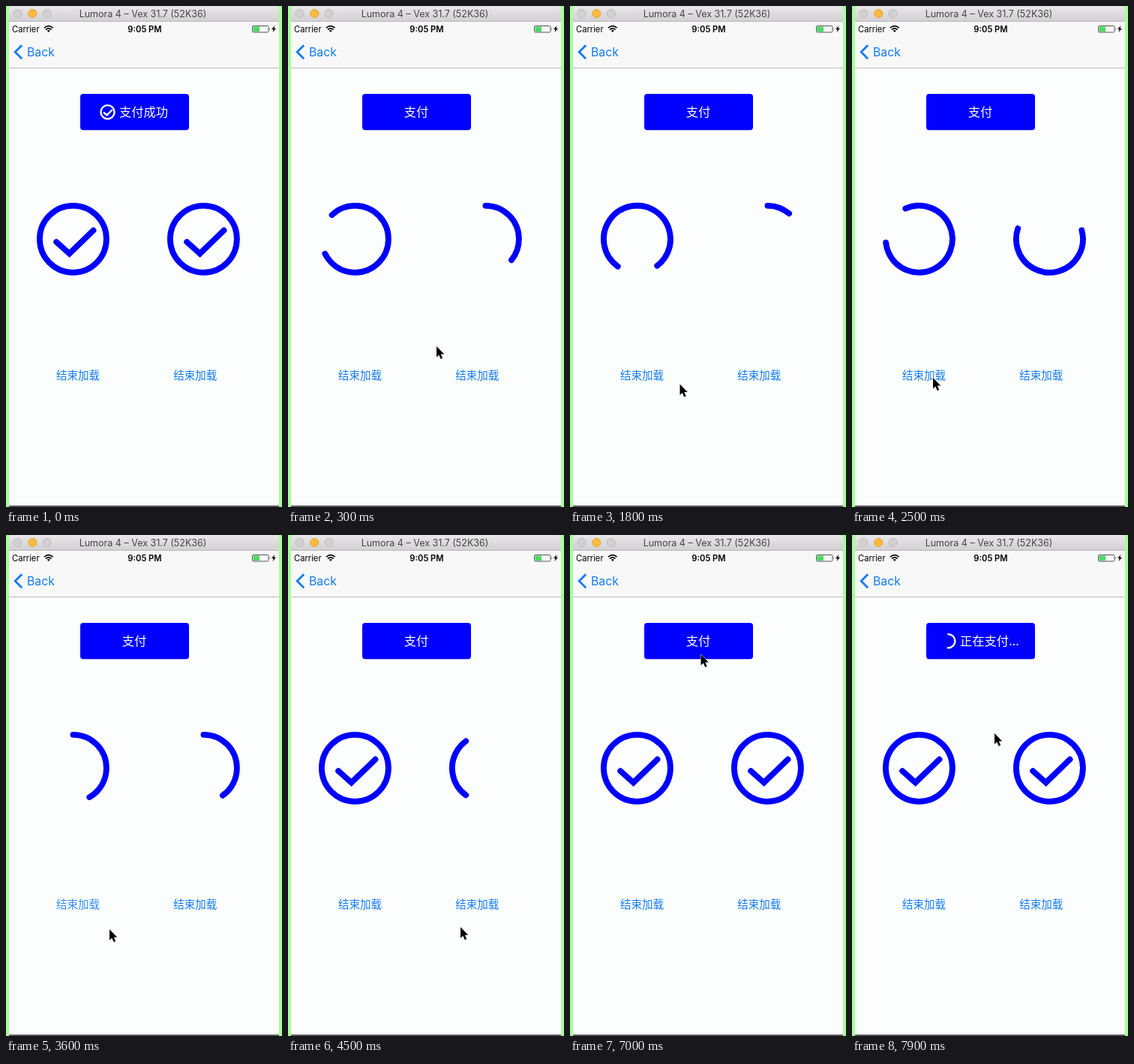
An HTML page for the animation above (8000 ms loop, 368 by 667 pixels).

```html
<!DOCTYPE html>
<html lang="zh-CN">
<head>
<meta charset="utf-8">
<title>Payment loading</title>
<style>
  html, body { margin: 0; width: 100%; height: 100%; overflow: hidden; background: #a6ff9c; }
  svg { display: block; width: 368px; height: 667px; }
  text { font-family: Inter, "Open Sans", sans-serif; }
  .cn { font-family: "Noto Sans CJK SC", "Noto Sans CJK", sans-serif; }
  .mid { text-anchor: middle; }
  .tint { fill: #147bf3; }
  .ring { fill: none; stroke-linecap: round; }
</style>
</head>
<body>
<svg viewBox="0 0 368 667">
  <defs>
    <linearGradient id="bar" x2="0" y2="1">
      <stop stop-color="#e9e7e9"/><stop offset="1" stop-color="#d1cfd1"/>
    </linearGradient>
  </defs>

  <!-- window and navigation bar -->
  <path fill="url(#bar)" d="M4 21V4Q4 0 8 0H360Q364 0 364 4V21Z"/>
  <path fill="#b9b7b9" d="M4 20H364V21H4Z"/>
  <path fill="#f8f8f8" d="M4 21H364V82H4Z"/>
  <path fill="#fcfefe" d="M4 83H364V665H4Z"/>
  <path fill="#bababc" d="M4 82H364V83H4Z"/>
  <path fill="#5c5c5e" d="M4 665H364V667H4Z"/>
  <g fill="#d2d0d2" stroke="#bdbbbd">
    <circle cx="15.5" cy="10" r="5.5"/>
    <circle cx="35.3" cy="10" r="5.5" fill="#fdbb3b" stroke="#e3a33a"/>
    <circle cx="54.7" cy="10" r="5.5"/>
  </g>
  <text class="mid" x="182.5" y="14.6" font-size="12.5" fill="#454446">Lumora 4 – Vex 31.7 (52K36)</text>

  <!-- status bar -->
  <text x="8" y="34.5" font-size="11.2">Carrier</text>
  <text class="mid" x="185" y="34.5" font-size="11.2" font-weight="600">9:05 PM</text>
  <g fill="none" stroke="#000" stroke-width="1.7">
    <path d="M51 29.2Q56.8 24.2 62.6 29.2M53.1 31.5Q56.8 28.3 60.5 31.5"/>
    <path d="M54.8 32.8Q56.8 31.2 58.8 32.8L56.8 35Z" fill="#000" stroke="none"/>
  </g>
  <rect x="328.5" y="26.5" width="21.5" height="8.5" rx="1.5" fill="none" stroke="#555"/>
  <rect x="329.5" y="27.5" width="8.5" height="6.5" fill="#4cd964"/>
  <path d="M351 29Q352.6 30.7 351 32.5Z" fill="#555"/>
  <path d="M358.5 26L354 31H356.5L355.5 35L360 29.7H357.3Z"/>
  <path d="M21.2 52.2L12.2 61.2L21.2 70.2" fill="none" stroke="#147bf3" stroke-width="2.8"/>
  <text class="tint" x="28" y="67" font-size="15.8">Back</text>

  <!-- pay button -->
  <rect x="99" y="117" width="145" height="48.3" rx="4" fill="#00f"/>
  <text id="title" class="cn" y="147.4" font-size="16.3" font-weight="350" fill="#fff"></text>

  <text id="endL" class="cn tint mid" x="96" y="496.7" font-size="14.5">结束加载</text>
  <text id="endR" class="cn tint mid" x="252.3" y="496.7" font-size="14.5">结束加载</text>

  <g id="rings"></g>
  <path id="cursor" d="M0 0V14.4L3.3 11.4L5.7 17L8.2 16L5.8 10.5H10.3Z"
        stroke="#fff" stroke-width="1" paint-order="stroke"/>
</svg>

<script>
const LOOP = 8000, STEP = 100;
const START = 100, DONE_L = 3320, DONE_R = 5500, PAY = 7560;
const $ = id => document.getElementById(id);
const clamp = v => Math.max(0, Math.min(1, v));

function add(tag, attrs, parent) {
  const el = document.createElementNS('http://www.w3.org/2000/svg', tag);
  for (const k in attrs) el.setAttribute(k, attrs[k]);
  return parent.appendChild(el);
}

// A ring with a tick, inside a square of the given size
function makeRing(size, width, color) {
  const g = add('g', { class: 'ring', stroke: color, 'stroke-width': width }, $('rings'));
  const arc = add('circle', { r: (size - width) / 2, pathLength: 360 }, g);
  const tick = add('path', {
    d: `M${-.23 * size} ${.04 * size}L${-.05 * size} ${.2 * size}L${.28 * size} ${-.12 * size}`,
    pathLength: 1
  }, g);
  return {
    place(x, y) { g.setAttribute('transform', `translate(${x} ${y})`); },
    // Degrees run clockwise from the top
    draw(from, length, check = 0) {
      arc.setAttribute('transform', `rotate(${from - 90})`);
      arc.setAttribute('stroke-dasharray', length + ' 360');
      tick.setAttribute('stroke-dasharray', check + ' 2');
      tick.style.display = check > 0 ? '' : 'none';
    },
    // The circle closes first, then the tick is drawn
    success(ms) { this.draw(0, 360 * clamp(ms / 670), clamp((ms - 670) / 270)); },
    // The head runs fast to three quarters, then slowly while the tail catches up
    chase(sec) {
      const s = sec % (.375 + .25 / .3);
      const head = s < .375 ? 2 * s : .75 + .3 * (s - .375);
      const tail = Math.max(0, 1 - (1 - head) / .25);
      this.draw(360 * tail, 360 * (head - tail));
    }
  };
}

const left = makeRing(96.8, 7.8, '#00f');
const right = makeRing(96.8, 7.8, '#00f');
const small = makeRing(20.6, 2.4, '#fff');
left.place(89.4, 310.3);
right.place(263.4, 310.3);

// Linear interpolation through rows of [time, ...values]
function track(rows, t) {
  let i = 1;
  while (i < rows.length - 1 && t > rows[i][0]) i++;
  const [a, b] = [rows[i - 1], rows[i]];
  const k = clamp((t - a[0]) / (b[0] - a[0]));
  return a.slice(1).map((v, j) => v + (b[j + 1] - v) * k);
}

const pointer = [
  [100, 200, 448], [1000, 191, 471], [1500, 172, 496], [1900, 138, 506],
  [2400, 108, 495], [3320, 108, 495], [3600, 138, 525], [3900, 172, 529],
  [4500, 230, 522], [5100, 250, 497], [5700, 250, 497], [6300, 214, 330],
  [6900, 175, 163], [7100, 174, 155], [7600, 174, 155], [7900, 190, 264]
];
const chaseTime = [[60, 0], [1000, .702], [2500, 1.756], [3600, 2.618], [5500, 4.04]];

// Pressed text goes pale at once and recovers after release
const pressAlpha = (t, release) =>
  t < release - 200 ? 1 : .2 + .8 * clamp((t - release) / 340);

function setTitle(text, x, anchor) {
  const el = $('title');
  if (el.textContent !== text) el.textContent = text;
  el.setAttribute('x', x);
  el.style.textAnchor = anchor;
}

function render(t) {
  const fresh = t >= START;

  if (!fresh) left.success(LOOP);
  else if (t < DONE_L) left.draw(77 + (t - 1000) * 259 / 1500, 288);
  else left.success(t - DONE_L);

  if (!fresh) right.success(LOOP);
  else if (t < DONE_R) right.chase(track(chaseTime, t)[0]);
  else right.success(t - DONE_R);

  const idle = fresh && t < PAY;
  $('rings').lastChild.style.display = idle ? 'none' : '';
  if (idle) setTitle('支付', 171, 'middle');
  else if (fresh) {
    setTitle('正在支付...', 144, 'start');
    small.place(128.3, 141.2);
    small.chase((t - PAY) * .00075);
  } else {
    setTitle('支付成功', 151, 'start');
    small.place(135.5, 141.2);
    small.success(LOOP);
  }

  $('endL').style.opacity = pressAlpha(t, DONE_L);
  $('endR').style.opacity = pressAlpha(t, DONE_R);
  $('cursor').style.display = fresh ? '' : 'none';
  $('cursor').setAttribute('transform', `translate(${track(pointer, t).join(' ')})`);
}

const origin = performance.now();
function tick() {
  const t = (performance.now() - origin) % LOOP;
  render(Math.floor(t / STEP) * STEP);
  requestAnimationFrame(tick);
}
tick();
</script>
</body>
</html>
```
